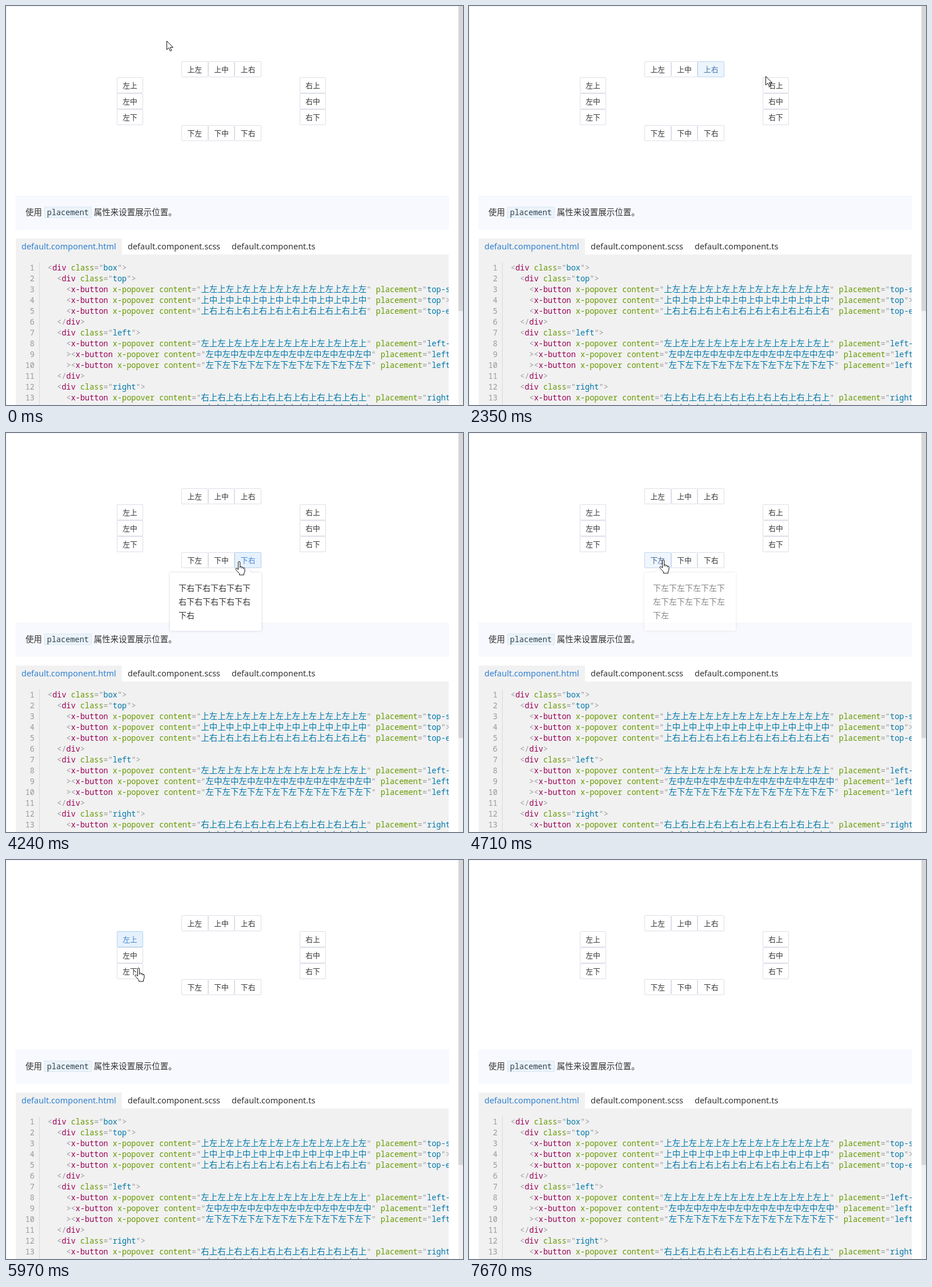
Write an HTML page that moves like this. It is 800 px wide and 700 px high and loops after 7990 ms.

```html
<!DOCTYPE html>
<html lang="zh-CN">
<head>
<meta charset="utf-8">
<title>Popover placement</title>
<style>
  html, body { margin: 0; width: 100%; height: 100%; overflow: hidden; background: #fff; }
  body { position: relative; color: #333; font: 14.5px/20px 'Noto Sans', 'Noto Sans CJK SC', 'Noto Sans CJK', sans-serif; }
  body *, body *::before { box-sizing: border-box; }
  .abs, .btn, .hot, .pop, .tip, .row, .tab { position: absolute; white-space: pre; }
  #edge { inset: 0 8px 0 0; border: solid #f0f1fa; border-width: 1px 0 0 1px; }
  #track { left: 792px; top: 0; width: 8px; height: 100%; background: #f1f1f1; }
  #thumb { width: 8px; height: 535px; background: #d6d6d6; }
  #note { left: 17px; top: 333px; width: 758px; height: 59px; padding-left: 16px;
    background: #f8f9fe; border: 1px solid #f4f6fc; line-height: 55px; }
  #note code { display: inline-block; padding: 1px 4px; border: 1px solid #d7e7f3;
    background: #ebf3fa; color: #2f4350; line-height: 16px; }
  code, .row { font-family: 'Noto Sans Mono', 'Noto Sans CJK SC', 'Noto Sans CJK', monospace; font-size: 13.55px; }
  .tab { top: 408px; height: 28px; padding: 0 10px; line-height: 26px; }
  .active { background: #f1f1f1; color: #3080d0; }
  #code { left: 17px; top: 436px; width: 758px; height: 264px; overflow: hidden; background: #f1f1f1; }
  #rule { left: 41px; top: 14px; width: 1px; height: 250px; background: #d4d8df; }
  .row { left: 56px; line-height: 19px; height: 19px; }
  .num { left: 0; width: 33px; text-align: right; color: #999; }
  .p { color: #999; } .t { color: #905; } .a { color: #690; } .v { color: #07a; }
  .cjk { font-size: 14.5px; line-height: 0; }
  .btn, .hot { width: 46.67px; height: 28px; border: 1px solid #dcdfe9; border-radius: 2px;
    background: #fff; font-size: 12.8px; line-height: 26px; text-align: center; }
  .hot { left: -1px; top: -1px; background: #e6f1fc; border-color: #b0d3f4; color: #3f86d8; opacity: 0; }
  .pop { width: 160px; height: 102px; filter: drop-shadow(0 0 2px rgba(20, 30, 70, .18)); opacity: 0; }
  .pop p { position: absolute; inset: 0; margin: 0; padding: 15px; border-radius: 2px; background: #fff;
    font-size: 14px; line-height: 24px; white-space: normal; }
  .tip { width: 8px; height: 8px; margin: -4px; background: #fff; transform: rotate(45deg); }
  svg { position: absolute; left: 0; top: 0; overflow: visible; fill: #fff; stroke: #111; stroke-linejoin: round; }
</style>
</head>
<body>
<div class="abs" id="edge"></div>
<div class="abs" id="note">使用 <code>placement</code> 属性来设置展示位置。</div>
<div class="tab active" style="left:17px">default.component.html</div>
<div class="tab" style="left:203px">default.component.scss</div>
<div class="tab" style="left:385px" id="lastTab">default.component.ts</div>
<div class="abs" id="code"><div class="abs" id="rule"></div></div>
<div class="abs" id="track"><div id="thumb"></div></div>
<div id="demo"></div>
<svg id="arrow" width="12" height="19"><path d="M.5.5v15.2l3.6-3.4 2.4 5.7 2.4-1-2.4-5.5h4.9z"/></svg>
<svg id="hand" width="18" height="25">
  <path d="M5.5 14.5V2.1a1.6 1.6 0 0 1 3.2 0V9.5q2.6-1 3 .9q2.4-.8 2.8 1q2.5-.5 2.5 1.8V17q0 2-1.5 4v3H7.5v-2.5L1.2 14.6q-.8-1.8 1-2.2q1.4 0 3.3 2.1z"/>
  <path d="M8.7 9.5v2.5M11.7 10.5v2M14.5 11.5v2" fill="none"/>
</svg>
<script>
const LOOP = 7990;
const byId = id => document.getElementById(id);
const clamp = v => Math.min(1, Math.max(0, v));

function add(parent, tag, className, text = '', style = {}) {
  const el = document.createElement(tag);
  el.className = className;
  el.textContent = text;
  Object.assign(el.style, style);
  return parent.appendChild(el);
}

// Code listing
const open = name => `  <div class="${name}">`;
const button = (label, place, lead = '') =>
  `    ${lead}<x-button x-popover content="${label.repeat(10)}" placement="${place}">${label}</x-button`;
const source = [
  '<div class="box">',
  open('top'), button('上左', 'top-start'), button('上中', 'top'), button('上右', 'top-end'), '  </div>',
  open('left'), button('左上', 'left-start'), button('左中', 'left', '>'), button('左下', 'left-end', '>'), '  </div>',
  open('right'), button('右上', 'right-start'), button('右中', 'right', '>')
];
const token = /(<\/?)([\w-]+)|([\w-]+)(?=[= ])|(=")([^"]*)(")|(>)|(\s+)|([^<>\s]+)/g;
const kinds = ['p', 't', 'a', 'p', 'v', 'p', 'p', '', ''];

source.forEach((line, i) => {
  const top = 14 + 19 * i + 'px';
  add(byId('code'), 'div', 'row num', i + 1, { top });
  const row = add(byId('code'), 'div', 'row', '', { top });
  for (const match of line.matchAll(token))
    match.slice(1).forEach((part, k) => {
      if (part) add(row, 'span', kinds[k] + (/[^\x00-\x7f]/.test(part) ? ' cjk' : ''), part);
    });
});

// Buttons and popovers
const W = 46.67, H = 28, POP_W = 160, POP_H = 102, GAP = 8;
const align = (key, size, pop) => ({ start: 0, mid: (size - pop) / 2, end: size - pop })[key];
const order = ['start', 'mid', 'end'];
const items = {};

function addItem(name, x, y, px, py, tipX, tipY) {
  const btn = add(byId('demo'), 'div', 'btn', name, { left: x + 'px', top: y + 'px' });
  items[name] = { hot: add(btn, 'div', 'hot', name), box: [px, py], tip: [tipX - px, tipY - py] };
}

for (const [side, y] of [['上', 97], ['下', 209]])
  [...'左中右'].forEach((c, i) => {
    const x = 307 + W * i, py = y + H + GAP;
    const px = x + align(side === '上' ? 'mid' : order[i], W, POP_W);
    addItem(side + c, x, y, px, py, x + W / 2, py);
  });
for (const [side, x] of [['左', 193.67], ['右', 513.67]])
  [...'上中下'].forEach((c, i) => {
    const y = 125 + H * i, px = side === '左' ? x - GAP - POP_W : x + W + GAP;
    addItem(side + c, x, y, px, y + align(order[i], H, POP_H), side === '左' ? px + POP_W : px, y + H / 2);
  });
for (const [name, item] of Object.entries(items)) {
  const [left, top] = item.box.map(v => v + 'px');
  item.pop = add(byId('demo'), 'div', 'pop', '', { left, top });
  add(item.pop, 'i', 'tip', '', { left: item.tip[0] + 'px', top: item.tip[1] + 'px' });
  add(item.pop, 'p', '', name.repeat(10));
}

// Button, pointer enters, pointer leaves
const visits = [
  ['上左', 310, 1005], ['上中', 1010, 1405], ['上右', 1875, 2285],
  ['右上', 2400, 2790], ['右中', 2800, 3155], ['右下', 3160, 3600],
  ['下右', 4005, 4450], ['下中', 4465, 4540], ['下左', 4600, 4885],
  ['左下', 5030, 5250], ['左中', 5255, 5500], ['左上', 5530, 5965],
  ['下左', 6110, 6425]
];

// Bursts of screen updates: start, end, count
const bursts = [
  [0, 0, 1], [70, 540, 7], [870, 1180, 5], [1410, 1640, 4], [1870, 2050, 3], [2290, 2350, 2],
  [2430, 3000, 8], [3160, 3930, 11], [4010, 4780, 11], [4890, 5640, 11], [5730, 5730, 1],
  [5970, 6280, 5], [6430, 6980, 8], [7220, 7670, 7]
];
const ticks = bursts.flatMap(([from, to, n]) =>
  Array.from({ length: n }, (_, i) => Math.floor((from + (to - from) * i / Math.max(1, n - 1)) / 10) * 10));

// Pointer tip: time, x, y, shape
const path = [
  [0, 281, 61, 'arrow'], [300, 325, 104, 'hand'], [540, 335, 112, 'hand'],
  [870, 342, 112, 'hand'], [1020, 370, 109, 'hand'], [1180, 377, 112, 'hand'],
  [1410, 392, 112, 'hand'], [1640, 448, 112, 'arrow'],
  [1870, 438, 113, 'hand'], [2050, 425, 114, 'hand'],
  [2290, 470, 118, 'arrow'], [2350, 519, 123, 'arrow'], [2430, 531, 138, 'hand'],
  [2700, 536, 145, 'hand'], [3000, 537, 168, 'hand'],
  [3160, 537, 185, 'hand'], [3500, 536, 196, 'hand'], [3600, 508, 204, 'arrow'],
  [3840, 425, 222, 'hand'], [3930, 412, 224, 'hand'],
  [4240, 408, 225, 'hand'], [4400, 404, 225, 'hand'], [4600, 346, 223, 'hand'], [4780, 335, 222, 'hand'],
  [4890, 300, 217, 'arrow'], [5030, 226, 198, 'hand'], [5180, 221, 194, 'hand'],
  [5260, 216, 161, 'hand'], [5400, 216, 163, 'hand'], [5640, 217, 138, 'hand'], [5730, 217, 138, 'hand'],
  [5970, 232, 189, 'hand'], [6040, 284, 214, 'arrow'], [6110, 324, 222, 'hand'], [6280, 335, 224, 'hand'],
  [6430, 350, 242, 'arrow'], [6800, 500, 398, 'arrow'], [6980, 541, 437, 'hand'],
  [7220, 560, 460, 'arrow'], [7600, 758, 680, 'arrow'], [7670, 758, 700, '']
];

function drawPointer(t) {
  const i = path.findLastIndex(key => key[0] <= t);
  const [t0, x0, y0, shape] = path[i];
  const [t1, x1, y1] = path[i + 1] || [t0 + 1, x0, y0];
  const k = (t - t0) / (t1 - t0);
  const x = Math.round(x0 + (x1 - x0) * k), y = Math.round(y0 + (y1 - y0) * k);
  for (const id of ['arrow', 'hand']) {
    byId(id).style.display = id === shape ? 'block' : 'none';
    byId(id).style.transform = `translate(${id === 'hand' ? x - 7 : x}px, ${y}px)`;
  }
}

function draw(time) {
  const t = ticks.findLast(tick => tick <= time);
  for (const [name, item] of Object.entries(items)) {
    let glow = 0, shown = 0;
    for (const [who, enter, leave] of visits) {
      if (who !== name) continue;
      const fade = clamp((t - enter) / 170);
      glow = Math.max(glow, fade * (1 - clamp((t - leave - 30) / 140)));
      if (t < leave) shown = Math.max(shown, fade);
    }
    item.hot.style.opacity = glow;
    item.pop.style.opacity = shown;
  }
  byId('lastTab').style.color = t >= 6950 && t < 7220 ? '#3080d0' : '';
  drawPointer(t);
}

const start = performance.now();
function frame() {
  draw((performance.now() - start) % LOOP);
  requestAnimationFrame(frame);
}
frame();
</script>
</body>
</html>
```
